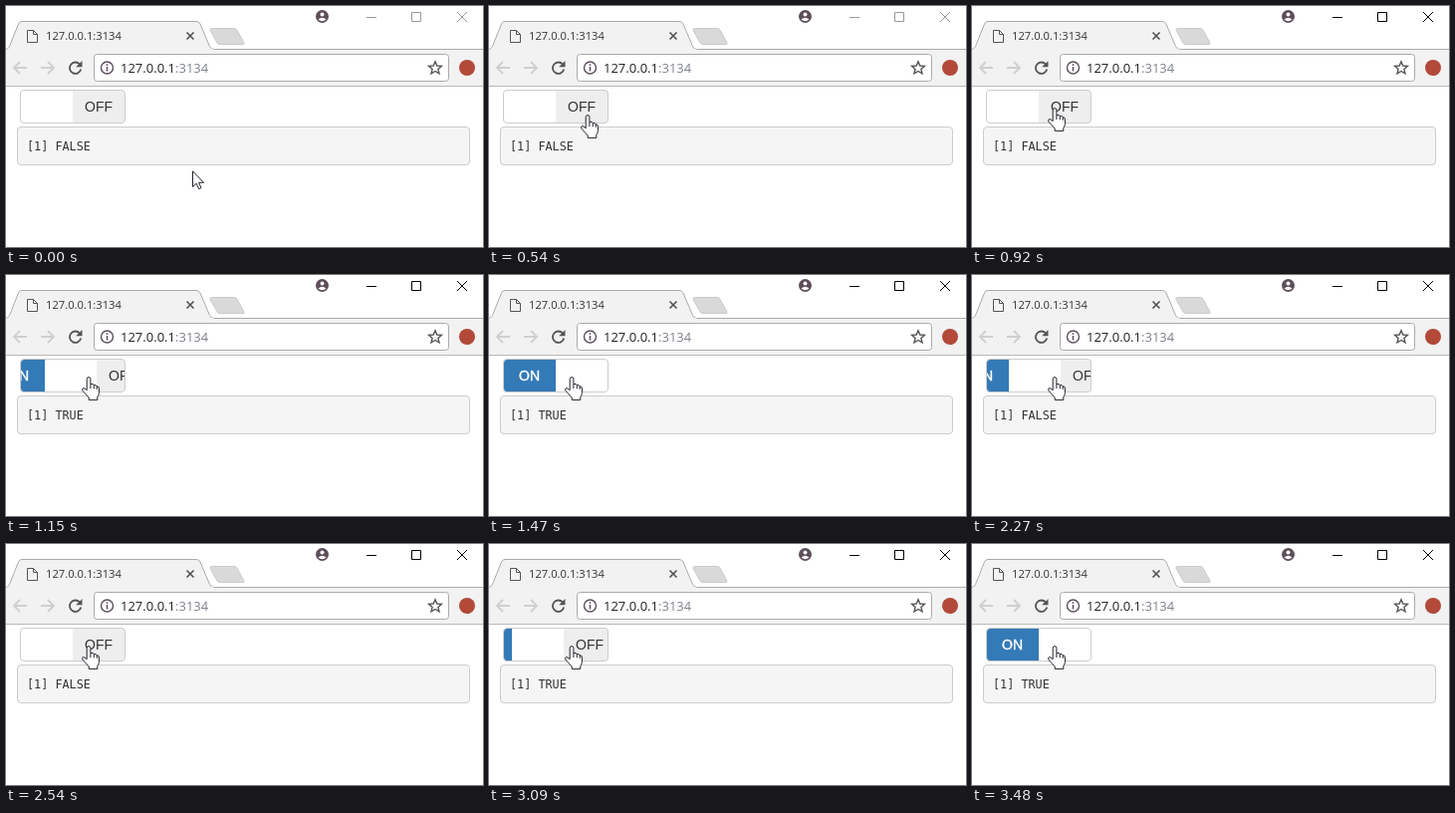
These frames come from a looping animation (479x242 px, 3940 ms). An HTML page:

```html
<!DOCTYPE html>
<html lang="en">
<head>
<meta charset="utf-8">
<title>Toggle switch demo</title>
<style>
  html, body { margin: 0; width: 100%; height: 100%; overflow: hidden; background: #fff; }
  svg { display: block; width: 479px; height: 242px; }
  text { white-space: pre; }
  .ui { font-family: "Open Sans", "Noto Sans", sans-serif; }
  .label { font: 14px "Liberation Sans", Arial, sans-serif; }
  .code { font: 11.8px "DejaVu Sans Mono", "Noto Sans Mono", monospace; }
  .line { fill: none; }
</style>
</head>
<body>
<svg viewBox="0 0 479 242">
  <defs>
    <clipPath id="switchClip"><rect x="15" y="85" width="104.5" height="32.5" rx="3"/></clipPath>
  </defs>

  <!-- Title bar and tab -->
  <rect y="43" width="479" height="37" fill="#f2f2f2"/>
  <path d="M0 43.5Q2.5 43 3.5 40.5L12.5 18Q13.5 15.5 16 15.5H191Q194 15.5 195 18L204.5 40.5Q205.5 43 208.5 43.5H479" fill="#f2f2f2" stroke="#aaa"/>
  <path d="M1 44H208" stroke="#f2f2f2" stroke-width="2"/>
  <path d="M206.5 22.5H229Q231.5 22.5 232.5 25L239 37Q239.5 38.5 238 38.5H215Q212.5 38.5 211.5 36L205 24.5Q204.5 22.5 206.5 22.5Z" fill="#d9d9d9" stroke="#cbcbcb"/>
  <path class="line" d="M21.500 24.500H27.500L31.500 28.500V36.500H21.500ZM27.500 24.500V28.500H31.500" stroke="#555"/>
  <text class="ui" x="40" y="34" font-size="11.2" fill="#333">127.0.0.1:3134</text>
  <path d="M181.500 26.500L188.500 33.500M188.500 26.500L181.500 33.500" stroke="#505050" stroke-width="1.6"/>

  <!-- Window controls -->
  <circle cx="317.500" cy="10.500" r="6.500" fill="#5d4e59"/>
  <circle cx="317.500" cy="8.500" r="2" fill="#fff"/>
  <path d="M313.500 13.500Q317.500 10 321.500 13.500Q317.500 17 313.500 13.500Z" fill="#fff"/>
  <path id="controls" class="line" d="M362 11.500H372M407.500 6.500H416.500V15.500H407.500ZM453 6L463 16M463 6L453 16"/>

  <!-- Toolbar -->
  <path d="M0 80.500H479" stroke="#b8b8b8"/>
  <g class="line" stroke-width="1.8">
    <path d="M21 62H9M14 56L8 62L14 68M35 62H47M42 56L48 62L42 68" stroke="#cfcfcf"/>
    <path d="M74 58.500A5.700 5.700 0 1 0 75.200 63.500" stroke="#555"/>
  </g>
  <path d="M76.500 55V61.300H70.200Z" fill="#555"/>
  <rect x="88.500" y="48.500" width="356" height="27" rx="3" fill="#fff" stroke="#aaa"/>
  <circle class="line" cx="101.500" cy="62" r="6" stroke="#5b4f5c" stroke-width="1.400"/>
  <path d="M101.500 61V65.500M101.500 58.300V59.900" stroke="#5b4f5c" stroke-width="1.500"/>
  <text class="ui" x="115" y="67" font-size="13" fill="#222">127.0.0.1<tspan fill="#7d818a">:3134</tspan></text>
  <path class="line" d="M431 55.700L432.800 60L437.400 60.400L433.900 63.400L435 67.900L431 65.500L427 67.900L428.100 63.400L424.600 60.400L429.200 60Z" stroke="#555" stroke-width="1.400"/>
  <circle cx="463" cy="62" r="8" fill="#b24939"/>

  <!-- Switch -->
  <g clip-path="url(#switchClip)">
    <g id="slider">
      <rect x="-37" y="84" width="52" height="34" fill="#337ab7"/>
      <rect x="67" y="84" width="53" height="34" fill="#eee"/>
      <text class="label" x="-22" y="106" fill="#fff" stroke="#fff" stroke-width=".4">ON</text>
      <text class="label" x="79" y="106" fill="#333">OFF</text>
    </g>
  </g>
  <rect class="line" x="14.500" y="84.500" width="105" height="33" rx="3.500" stroke="#ccc"/>

  <!-- Printed value -->
  <rect x="11.500" y="121.500" width="454" height="38" rx="3.500" fill="#f5f5f5" stroke="#ccc"/>
  <text id="output" class="code" x="21" y="145" fill="#333"></text>

  <!-- Pointer: both shapes have their hot spot at 0,0 -->
  <g id="pointer" fill="#fff" stroke="#222029" stroke-linejoin="round">
    <path id="arrow" d="M.5 .8V16.500L4.200 13.200L6.700 18.700L9 17.700L6.600 12.300H11.500Z"/>
    <g id="hand" transform="translate(-5 0)">
      <path d="M5.200 2.500Q5.300 .6 7 .6Q8.800 .6 8.900 2.500V7.600Q11.500 6.800 12.300 8.600Q14.600 7.900 15.200 9.800Q17.400 9.500 17.400 12V16.500Q17.300 18.500 15.800 20.500V23.400H7.200V21L1.200 14.500Q.1 12.500 1.200 11.700Q2.700 11 5.200 13.700Z"/>
      <path class="line" d="M8.900 7.600V12M12.300 8.600V12.300M15.200 9.800V12.800"/>
    </g>
  </g>
</svg>

<script>
const LOOP = 3940;
const FRAME = 76.8, FIRST_FRAME = 150;
const FOCUS_TIME = 915;
const TOGGLE_TIMES = [1038, 2088, 3015];
const SLIDE_DURATION = 400, SLIDE_WIDTH = 52;
const MOVE_START = 73, MOVE_DURATION = 614;
const FROM = { x: 187, y: 165 }, TO = { x: 81, y: 102 };

const byId = id => document.getElementById(id);
const [slider, output, controls, pointer, arrow, hand] =
  ["slider", "output", "controls", "pointer", "arrow", "hand"].map(byId);

const clamp01 = value => Math.min(1, Math.max(0, value));
const mix = (from, to, amount) => Math.round(from + (to - from) * amount);
const moveTo = (node, x, y = 0) => node.setAttribute("transform", `translate(${x} ${y})`);
const show = (node, visible) => node.setAttribute("display", visible ? "inline" : "none");

// One coordinate of a cubic Bezier from 0 to 1 with inner points a and b.
const bezier = (a, b, s) => 3 * (1 - s) ** 2 * s * a + 3 * (1 - s) * s * s * b + s ** 3;

// CSS "ease": cubic-bezier(.25, .1, .25, 1), solved by bisection.
function ease(progress) {
  let low = 0, high = 1;
  for (let i = 0; i < 16; i++) {
    const middle = (low + high) / 2;
    if (bezier(.25, .25, middle) < progress) low = middle; else high = middle;
  }
  return bezier(.1, 1, high);
}

function drawPointer(time) {
  const remaining = (1 - clamp01((time - MOVE_START) / MOVE_DURATION)) ** 1.35;
  const x = mix(TO.x, FROM.x, remaining);
  const y = mix(TO.y, FROM.y, remaining ** 1.15);   // slightly curved path
  const overSwitch = y < 118;
  moveTo(pointer, x, y);
  show(arrow, !overSwitch);
  show(hand, overSwitch);
}

function drawSwitch(time) {
  const toggles = TOGGLE_TIMES.filter(start => start <= time);
  const isOn = toggles.length % 2 === 1;
  const amount = toggles.length ? ease(clamp01((time - toggles.at(-1)) / SLIDE_DURATION)) : 1;
  moveTo(slider, mix(0, SLIDE_WIDTH, isOn ? amount : 1 - amount));
  output.textContent = "[1] " + (isOn ? "TRUE" : "FALSE");
}

function draw(now) {
  const frame = Math.floor((now % LOOP - FIRST_FRAME) / FRAME);
  const time = FIRST_FRAME + frame * FRAME;
  drawPointer(time);
  drawSwitch(time);
  controls.setAttribute("stroke", time < FOCUS_TIME ? "#999" : "#000");
}

const startTime = performance.now();
function tick() {
  draw(performance.now() - startTime);
  requestAnimationFrame(tick);
}
tick();
</script>
</body>
</html>
```
